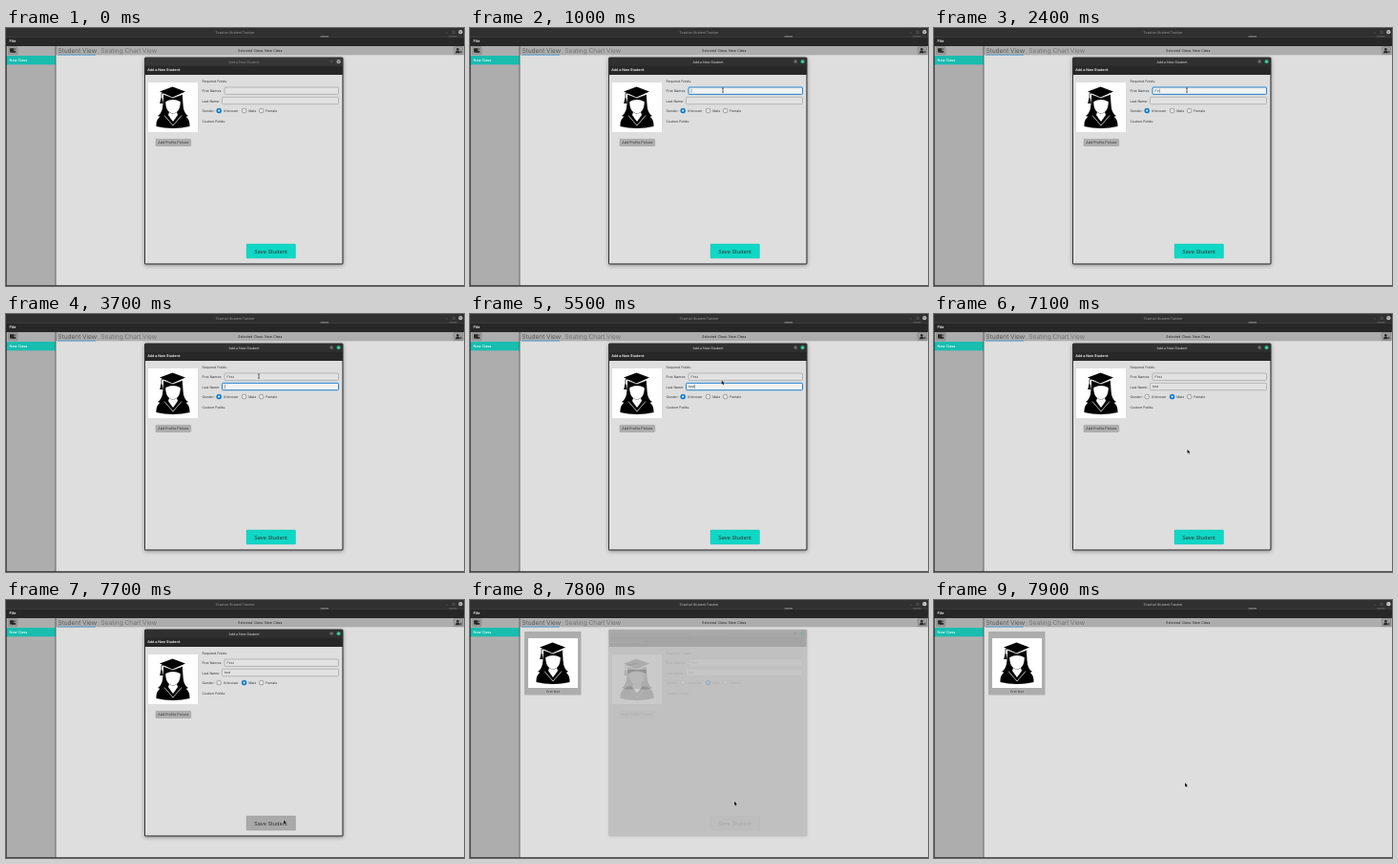
An HTML page with a canvas that plays this animation: 480 by 270 pixels, repeating every 8000 ms.

```html
<!DOCTYPE html>
<html lang="en">
<head>
<meta charset="utf-8">
<title>Add a student</title>
<style>
html, body { margin: 0; width: 100%; height: 100%; overflow: hidden; background: #dedede; }
canvas { display: block; width: 480px; height: 270px; }
</style>
</head>
<body>
<canvas id="stage" width="480" height="270"></canvas>
<script>
const ctx = document.getElementById('stage').getContext('2d');
const LOOP = 8000, STEP = 100;
const BLUE = '#0a78cf', TEAL = '#10d7c5', INK = '#383838';

// Pointer keys: time, x, y
const path = [
  [100, 338, 170], [800, 265, 65], [5000, 265, 65], [5400, 264, 70],
  [5900, 262, 73], [6200, 249, 85], [6800, 249, 85],
  [7500, 291, 231], [7700, 291, 231], [7900, 263, 192]
];

function rect(x, y, w, h, color) {
  ctx.fillStyle = color;
  ctx.fillRect(x, y, w, h);
}

function box(x, y, w, h, r, fill, line, width = 0.5) {
  ctx.beginPath();
  ctx.roundRect(x, y, w, h, r);
  ctx.fillStyle = fill;
  ctx.fill();
  if (line) {
    ctx.strokeStyle = line;
    ctx.lineWidth = width;
    ctx.stroke();
  }
}

function disc(x, y, r, fill, line, width = 0.6) {
  ctx.beginPath();
  ctx.arc(x, y, r, 0, Math.PI * 2);
  ctx.fillStyle = fill;
  ctx.fill();
  if (line) {
    ctx.strokeStyle = line;
    ctx.lineWidth = width;
    ctx.stroke();
  }
}

function shape(d, fill) {
  ctx.fillStyle = fill;
  ctx.fill(new Path2D(d));
}

function stroke(d, color, width) {
  ctx.strokeStyle = color;
  ctx.lineWidth = width;
  ctx.stroke(new Path2D(d));
}

function text(s, x, y, size, color, align = 'left', weight = 400) {
  ctx.font = `${weight} ${size}px Inter, Roboto, sans-serif`;
  ctx.textAlign = align;
  ctx.fillStyle = color;
  ctx.fillText(s, x, y);
}

function closeButton(x, y, fill, mark) {
  disc(x, y, 2.1, fill);
  stroke(`M${x - 0.8} ${y - 0.8}l1.6 1.6m0 -1.6l-1.6 1.6`, mark, 0.5);
}

function portrait(x, y) {
  ctx.save();
  ctx.translate(x, y);
  rect(0, 0, 52, 52, '#fff');
  // hair, face and gown
  shape('M16 16C15 25 16 31 10 35C17 38 22 36 26 36C31 36 36 38 42 35C36 31 37 25 36 16Z', '#000');
  shape('M8.5 46C8 38 12 34 20 33L26 40L32 33C40 34 44 38 43.5 46Q35 48 26 48Q17 48 8.5 46Z', '#000');
  shape('M18.3 20Q26 16 33.7 20C34 27 31 32 26 32.5C21 32 18 27 18.3 20Z', '#fff');
  shape('M22 31Q26 34 30 31L31 34L26 41L21 34Z', '#fff');
  stroke('M17 34.5L26 45L35 34.5', '#fff', 0.7);
  // cap and tassel
  shape('M16 12.5L26 16L36 12.5V20Q26 14.5 16 20Z', '#000');
  shape('M12 9.5L25.5 4.5L39 9.5L25.5 15.5Z', '#000');
  stroke('M16 12.5L26 16.4L36 12.5', '#fff', 0.4);
  stroke('M26 9.5L14 11.5V18', '#000', 0.7);
  shape('M13.4 16.5H14.6L15.6 22H12.2Z', '#000');
  ctx.restore();
}

function person(x, y) {
  disc(x, y - 1.5, 1.3, '#292929');
  shape(`M${x - 2.5} ${y + 2.5}Q${x - 2} ${y - 0.4} ${x} ${y - 0.2}Q${x + 2} ${y - 0.4} ${x + 2.5} ${y + 2.5}Z`, '#292929');
}

function mainWindow(saved) {
  rect(0, 0, 480, 270, '#dedede');
  rect(0, 0, 480, 9.5, '#303030');
  rect(0, 9.5, 480, 9.5, '#272727');
  rect(0, 9, 480, 0.5, '#1d1d1d');
  text('Teacher Student Tracker', 240, 5.6, 3.5, saved ? '#c4c4c4' : '#9c9c9c', 'center');
  rect(329.5, 8.6, 8.5, 0.7, '#bcbcbc');
  rect(464, 8.6, 8.5, 0.6, '#777');
  stroke('M460.8 5h2.4M468 3.2h2.3v2.3h-2.3z', '#777', 0.4);
  closeButton(476.4, 4.2, saved ? '#e6e6e6' : '#c8c8c8', '#303030');
  text('File', 3.6, 14.9, 4, '#f4f4f4', 'left', 600);

  rect(0, 19, 52, 251, '#adadad');
  rect(52, 19, 428, 9.3, '#adadad');
  rect(0, 29, 52, 9.3, '#18bdae');
  text('New Class', 3.6, 35, 3.7, '#f4fffd', 'left', 500);
  rect(51.6, 19, 0.8, 251, '#4c4c4c');
  box(2.5, 19.6, 9.5, 8, 0.6, '#9a9a9a', '#777', 0.4);
  rect(4, 21.2, 4.2, 4.3, '#292929');
  rect(6, 24, 4.2, 1.8, '#292929');
  stroke('M8 22.2h2.5M9.2 21v2.4', '#333', 0.5);
  box(469.3, 19.6, 9.5, 8, 0.6, '#9a9a9a', '#777', 0.4);
  person(473.4, 23.8);
  stroke('M475.5 25h2.4M476.7 23.8v2.4', '#292929', 0.6);

  text('Student View', 54.5, 25.6, 6.6, '#424242', 'left', 300);
  text('Seating Chart View', 99.6, 25.6, 6.6, '#666', 'left', 300);
  rect(54, 27.6, 40, 0.9, '#4696d2');
  text('Selected Class: New Class', 266.3, 25, 3.7, '#292929', 'center');
  rect(0, 19, 0.7, 251, '#333');
  rect(0, 269.2, 480, 0.8, '#333');

  if (saved) {
    rect(57, 33, 59.5, 66.5, '#adadad');
    portrait(61, 40);
    text('first test', 87, 97.2, 3.5, INK, 'center');
  }
}

function field(x, y, value, focus, caret) {
  const right = 348.5;
  box(x, y, right - x, 7.4, 1, focus ? '#f1f1f1' : '#e2e2e2', focus ? BLUE : '#989898', focus ? 0.9 : 0.6);
  text(value, x + 2.6, y + 4.9, 3.5, INK);
  if (focus && caret) rect(x + 2.8 + ctx.measureText(value).width, y + 1.7, 0.4, 4.2, '#333');
}

function radio(x, label, on, hover) {
  if (on) {
    disc(x, 86.5, 2.6, BLUE, '#0862ad', 0.3);
    disc(x, 86.5, 1.05, '#fff');
  } else {
    disc(x, 86.5, 2.4, hover ? '#6f7780' : '#e4e4e4', '#777');
  }
  text(label, x + 4.6, 87.8, 3.5, INK);
}

function typed(word, times, t) {
  return word.slice(0, times.filter(k => t >= k).length);
}

function dialog(t) {
  const active = t >= 1000, male = t >= 6400, hover = t >= 7400;
  ctx.save();
  ctx.shadowColor = 'rgba(0,0,0,.35)';
  ctx.shadowBlur = 4;
  ctx.shadowOffsetY = 1;
  box(145, 30.5, 208.5, 217, 1.5, '#353535');
  ctx.restore();
  box(145.4, 31, 207.6, 9, 1, active ? '#303030' : '#363636');
  rect(145.8, 39.8, 206.8, 9.2, '#272727');
  rect(146, 49, 206.4, 197.4, '#dedede');
  text('Add a New Student', 249.4, 36.8, 3.5, active ? '#e0e0e0' : '#858585', 'center');
  disc(341.2, 35.1, 1.4, active ? '#606060' : '#454545', active ? '#999' : '#555', 0.4);
  closeButton(348.6, 35.2, active ? '#16a67a' : '#aaa', active ? '#fff' : '#333');
  text('Add a New Student:', 148.2, 45.3, 3.65, '#f4f4f4', 'left', 600);

  portrait(149, 57);
  box(157, 116.3, 36.7, 7.2, 0.6, '#adadad', '#929292', 0.4);
  text('Add Profile Picture', 175.3, 121.2, 3.65, INK, 'center');

  text('Required Fields:', 205.5, 57, 3.5, INK);
  text('First Names:', 205.5, 67.4, 3.5, INK);
  text('Last Name:', 205.5, 77.7, 3.5, INK);
  text('Gender:', 205.5, 87.8, 3.5, INK);
  text('Custom Fields:', 205.5, 98.5, 3.5, INK);

  const blink = t % 1000 < 600;
  field(229, 62, typed('First', [1500, 1900, 2400, 2800, 3100], t), t >= 1000 && t < 3700, blink);
  field(226.5, 72.3, typed('test', [4200, 4400, 4600, 5100], t), t >= 3700 && t < 6200, t === 3700 || blink);
  radio(223.2, 'Unknown', !male);
  radio(249.6, 'Male', male, t >= 6200);
  radio(267.7, 'Female', false);

  box(252, 226, 51.5, 15, 0.8, hover ? '#a9a9a9' : TEAL, hover ? '#949494' : '#11bfb0', 0.4);
  text('Save Student', 277.5, 235.5, 5.5, '#303030', 'center');
}

function pointer(t) {
  if (t < path[0][0]) return;
  let i = path.findIndex(k => k[0] > t);
  if (i < 0) i = path.length;
  const a = path[i - 1], b = path[i] || a;
  let k = b === a ? 0 : (t - a[0]) / (b[0] - a[0]);
  k = k * k * (3 - 2 * k);
  const x = a[1] + (b[1] - a[1]) * k, y = a[2] + (b[2] - a[2]) * k;
  if (t < 7800 && x > 229 && y > 61.5 && y < 69.5) {
    stroke(`M${x - 1} ${y - 2}h2m-1 0v4.2m-1 0h2`, '#222', 0.6);
  } else {
    const d = `M${x} ${y - 0.8}v4.2l1 -0.9l0.7 1.5l0.7 -0.3l-0.7 -1.4h1.3z`;
    stroke(d, '#eee', 0.5);
    shape(d, '#111');
  }
}

function draw(t) {
  ctx.textRendering = 'geometricPrecision';
  mainWindow(t >= 7800);
  if (t < 7900) {
    ctx.globalAlpha = t < 7800 ? 1 : 0.15;
    dialog(t);
    ctx.globalAlpha = 1;
  }
  pointer(t);
}

const start = performance.now();
function tick() {
  const t = (performance.now() - start) % LOOP;
  draw(Math.floor(t / STEP) * STEP);
  requestAnimationFrame(tick);
}
tick();
</script>
</body>
</html>
```
